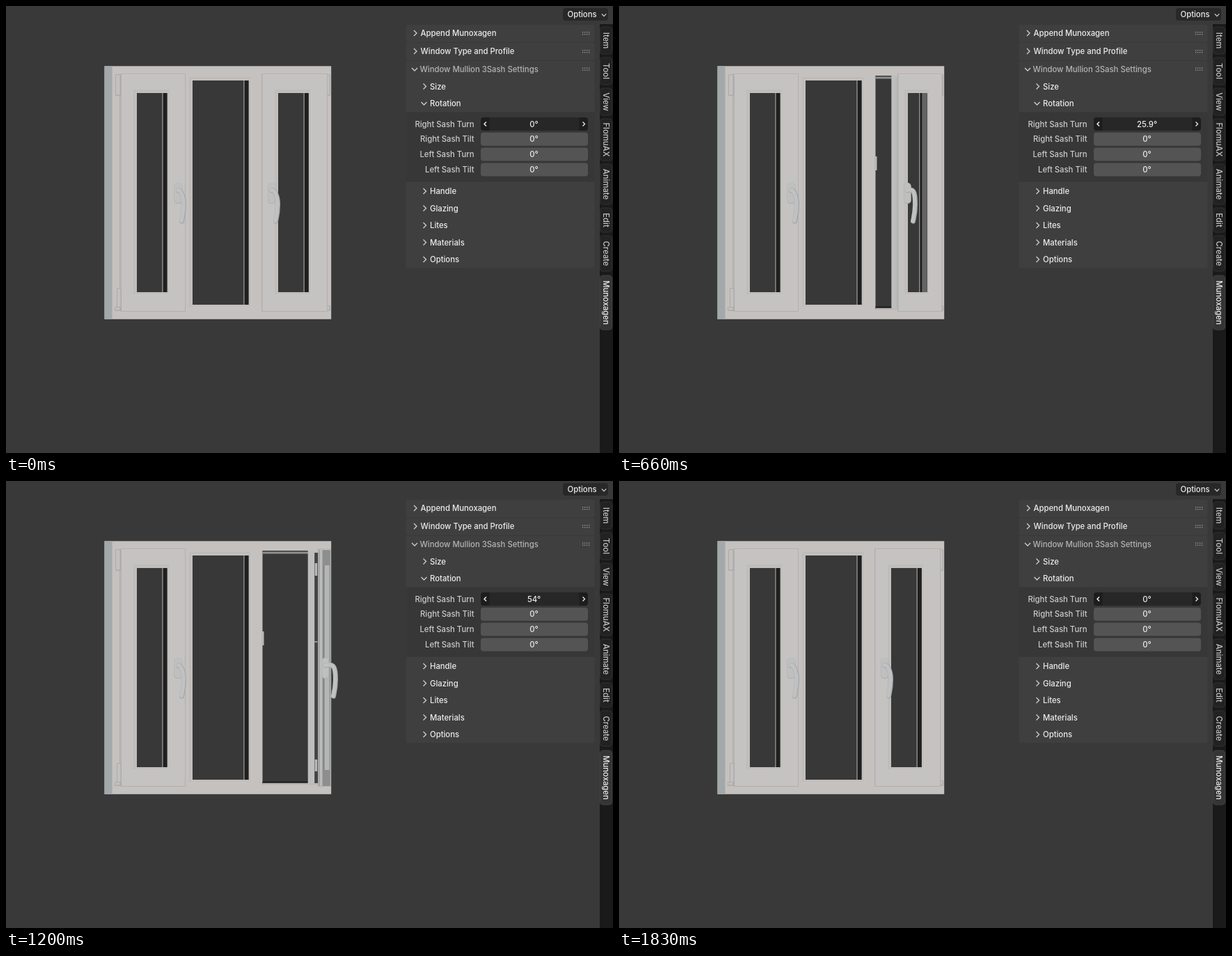
Write an HTML page that moves like this. It is 872 px wide and 642 px high and loops after 1860 ms.

```html
<!DOCTYPE html>
<html lang="en">
<head>
<meta charset="utf-8">
<title>Sash rotation</title>
<style>
html, body { margin: 0; width: 100%; height: 100%; overflow: hidden; background: #393939; }
svg { display: block; width: 872px; height: 642px; }
text { font: 500 11.3px Inter, "Open Sans", sans-serif; fill: #ececec; }
.dim { fill: #b4b4b4; }
.label { fill: #cbcbcb; text-anchor: end; }
.mid { text-anchor: middle; }
.tab { fill: #c6c6c6; text-anchor: middle; }
</style>
</head>
<body>
<svg viewBox="0 0 872 642">
  <g id="scene"></g>
  <g id="sash"></g>
  <g id="ui"></g>
  <text id="angle" class="mid" x="758.5" y="173.5">0°</text>
</svg>
<script>
const LOOP = 1860, STEP = 30;
// time in ms, sash angle in degrees
const TURN = [[0, 0], [60, 0], [180, 1.3], [330, 5.2], [480, 12.3], [570, 18.6],
  [660, 25.9], [930, 52.9], [1020, 54], [1200, 54], [1290, 48.4], [1590, 20.8],
  [1680, 8.6], [1740, 1.6], [1770, 0], [LOOP, 0]];
const PEAK = 1020;

const $ = id => document.getElementById(id);

// edges are given as left, top, right, bottom
const box = (l, t, r, b, fill, extra = '') =>
  `<rect x="${l}" y="${t}" width="${Math.max(0, r - l)}" height="${b - t}" fill="${fill}" ${extra}/>`;
const path = (d, color, width, extra = '') =>
  `<path d="${d}" fill="none" stroke="${color}" stroke-width="${width}" ${extra}/>`;
const label = (x, y, str, cls = '') => `<text x="${x}" y="${y + 4}" class="${cls}">${str}</text>`;
const curve = (a, start, lin, quad) => start + lin * a + quad * a * a;
const clamp = k => Math.min(1, Math.max(0, k));
const mix = (from, to, k) => {
  const c = from.map((v, i) => Math.round(v + (to[i] - v) * k));
  return `rgb(${c})`;
};

const right = (x, y, s = 4, color = '#cfcfcf') =>
  path(`M${x - s / 2} ${y - s}l${s} ${s}l${-s} ${s}`, color, 1.3);
const down = (x, y, s = 4) =>
  path(`M${x - s} ${y - s / 2}l${s} ${s}l${s} ${-s}`, '#cfcfcf', 1.3);

// glow lightens the outer part of the reveal as the sash turns
function opening(l, t, r, b, strip, glow = 0) {
  const x = r - strip;
  return box(l - 4, t - 4, r + 4, b + 4, '#c1bebc') +
    path(`M${l - 4} ${b + 4}V${t - 4}H${r + 4}`, '#bab8b6', 1) +
    path(`M${l - 4} ${b + 4}H${r + 4}V${t - 4}`, '#c9c6c4', 1) +
    box(l, t, r, b, '#383838') +
    box(x, t, r, b, '#1d1d1d') +
    box(x + strip * .3, t, r, b, mix([32, 32, 32], [100, 100, 100], glow)) +
    box(x - 1, t, x + .3, b, '#979797');
}

function leaf(l, t, r, b, fill = '#c5c3c1') {
  return box(l - 1.5, t - 1, r + 1, b + 1, '#b2b0af') +
    box(l, t, r, b, fill) +
    path(`M${l} ${t + .5}H${r}`, '#cac8c6', 1);
}

function handle(x, width, tip, open) {
  const bend = tip - 3.5, start = x + width * .5;
  const d = `M${start} 265C${bend - 6 + open * 4} ${263 - open} ${bend} ${271 - open * 4} ${bend} 285` +
    `C${bend} 298 ${bend - 2} 304 ${bend - 3} 309`;
  return box(x - .5, 254, x + width + .5, 284, '#aeafb0', `rx="${width / 2}"`) +
    box(x, 254, x + width, 283, '#bfbfbf', `rx="${width / 2}"`) +
    path(d, '#a6a8aa', 7, 'stroke-linecap="round"') +
    path(d, '#c0c1c2', 5.4, 'stroke-linecap="round" transform="translate(-.5 -.4)"');
}

function hinge(x, t, b, w) {
  return box(x, t, x + w, b, '#acabaa', 'rx="1.5"') +
    box(x + 1, t + 1, x + w - 1.5, b - 1.5, '#c3c1bf', 'rx="1"');
}

function drawScene() {
  return box(0, 0, 872, 642, '#393939') +
    box(141.5, 86.3, 467.2, 449.8, '#c4c1bf') +
    box(141.5, 86.3, 152.5, 449.8, '#a3a8ab') +
    path('M163.5 98V438', '#b0aead', 1) +
    leaf(166, 98, 257, 438) +
    hinge(157, 98, 129, 8) + hinge(159, 405, 438, 7) + hinge(156, 432, 438, 9) +
    opening(188, 125, 231.3, 411, 6) +
    opening(268, 107, 348.3, 429, 6) +
    handle(242, 11, 259, 0);
}

function drawSash(a, rising) {
  const l = curve(a, 368.5, 1.066, .00804);
  const r = curve(a, 461, .09, 0);
  const gl = curve(a, 391, .655, .0105);
  const gr = curve(a, 434.5, .08, .00885);
  const side = l - Math.min(a, 5) - .2 * a;
  const wide = clamp((a - 28) / 20);
  let out = '';
  if (a > 0) {
    const lit = clamp((a - 10) / 15);
    out += box(368.5, 100, r, 436, '#383838') +
      box(368.5, 100.5, l, 101.7, '#4a4a4a') + box(368.5, 101.7, l, 104.5, '#8f9090') +
      box(368.5, 431.5, l, 433.8, '#1d1d1d') + box(368.5, 433.8, l, 436, '#b4b3b2') +
      box(367, 216, 370.5, 236, '#b8b9ba') +
      box(side, 100, l, 435, mix([148, 152, 155], [190, 190, 189], lit));
    const seam = side + (l - side) * .6;
    const shade = rising
      ? mix([148, 152, 155], [182, 184, 185], lit * (1 - wide * .8))
      : '#414344';
    out += box(seam, 103, l - .8, 434, shade);
    if (wide) {
      out += box(seam + .5, 118, seam + 4, 136, '#b8b9b9') +
        box(seam + .5, 400, seam + 4, 417, '#b8b9b9') +
        path(`M${seam} 231H${l - 2}`, '#b5b5b5', 1.5);
    }
  }
  out += hinge(460, 98, 129, 6) + hinge(460, 430, 438, 6) +
    leaf(l, 98, r, 438, mix([197, 195, 193], [141, 143, 143], wide));
  if (wide) {
    out += box(l + 1, 98, l + 5, 438, mix([197, 195, 193], [188, 188, 187], wide)) +
      box(gl, 121, gr, 415, mix([56, 56, 56], [180, 181, 181], wide)) +
      path(`M${gl} 121V415`, '#797b7c', 1);
  } else {
    out += opening(gl, 125, gr, 411, 6 + .17 * a, clamp(a / 20));
  }
  return out + handle(curve(a, 376.5, 1.118, .006), 10.5 - a * .03,
    curve(a, 394, 1.18, .0066), clamp(a / 25));
}

function drawTabs() {
  const tabs = [['Item', 30, 69], ['Tool', 74, 113], ['View', 118, 157], ['FlomuAX', 162, 222],
    ['Animate', 227, 285], ['Edit', 290, 325], ['Create', 330, 381], ['Munoxagen', 387, 465]];
  return box(853, 26, 872, 642, '#1a1a1a') + tabs.map(([name, t, b], i) => {
    const on = i === tabs.length - 1;
    return box(853.5, t, 870.5, b, on ? '#353535' : '#222222',
      `rx="4" stroke="${on ? '#404040' : '#303030'}"`) +
      `<text class="${on ? 'mid' : 'tab'}" transform="translate(857.5 ${(t + b) / 2}) rotate(90)">${name}</text>`;
  }).join('');
}

function drawPanel() {
  const panel = (t, b) => box(574.5, t, 845.5, b, '#3f3f3f', 'rx="3"');
  let out = panel(27, 52) + panel(53, 78) + panel(79, 376) +
    box(574.5, 152.5, 845.5, 252.5, '#373737');
  for (const y of [37, 63, 88.5])
    for (let i = 0; i < 8; i++)
      out += box(828 + i % 4 * 3, y + (i >> 2) * 3, 829.3 + i % 4 * 3, y + 1.3 + (i >> 2) * 3, '#a0a0a0');

  out += right(588, 39) + label(595.5, 39, 'Append Munoxagen') +
    right(588, 65) + label(595.5, 65, 'Window Type and Profile') +
    down(587, 91) + label(594.5, 91, 'Window Mullion 3Sash Settings', 'dim') +
    down(600.5, 140) + label(609, 140, 'Rotation');
  const closed = { Size: 115.5, Handle: 266, Glazing: 290.5, Lites: 315, Materials: 339.5, Options: 364 };
  for (const name in closed)
    out += right(601.5, closed[name]) + label(609, closed[name], name);

  ['Right Sash Turn', 'Right Sash Tilt', 'Left Sash Turn', 'Left Sash Tilt'].forEach((name, i) => {
    const y = 169.5 + i * 21.8;
    out += label(672.5, y, name, 'label') +
      box(682, y - 9.5, 836, y + 9.5, i ? '#545454' : '#1d1d1d', 'rx="4"');
    if (i) out += label(758.5, y, '0°', 'mid');
  });
  return out + box(694.5, 160, 823.5, 179, '#272727') +
    path('M690 166.5l-3 3l3 3', '#eeeeee', 1.5) +
    right(830, 169.5, 3, '#eeeeee') +
    box(800, 3, 865, 21, '#282828', 'rx="4"') +
    label(806.5, 12, 'Options') + down(859, 13, 3.2);
}

function angleAt(t) {
  const i = TURN.findIndex(p => p[0] > t);
  const [t0, a0] = TURN[i - 1], [t1, a1] = TURN[i];
  return +(a0 + (a1 - a0) * (t - t0) / (t1 - t0)).toFixed(1);
}

$('scene').innerHTML = drawScene();
$('ui').innerHTML = drawPanel() + drawTabs();

const begin = performance.now();
let shown = -1;
function frame(now) {
  const t = Math.floor((Math.max(0, now - begin) + .01) / STEP) * STEP % LOOP;
  if (t !== shown) {
    shown = t;
    const a = angleAt(t);
    $('sash').innerHTML = drawSash(a, t < PEAK);
    $('angle').textContent = a + '°';
  }
  requestAnimationFrame(frame);
}
frame(begin);
</script>
</body>
</html>
```
